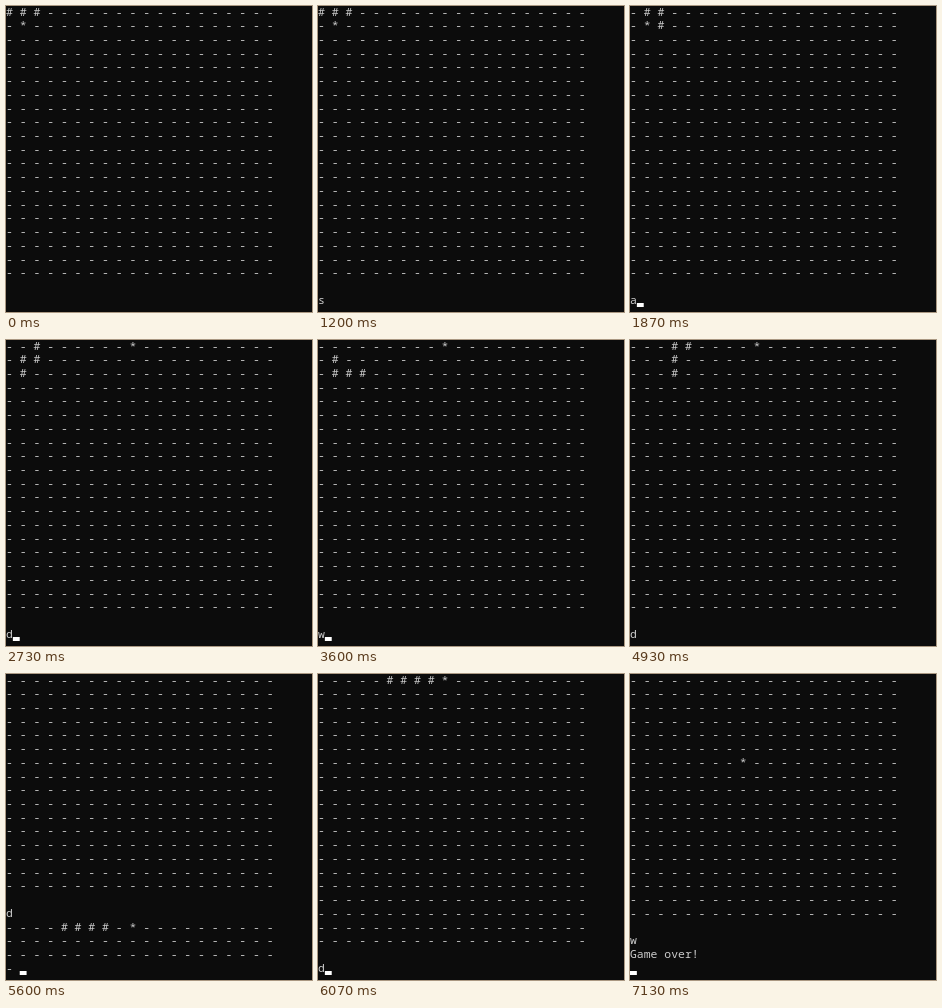
An HTML page that plays this animation: 306x306 px, repeating every 7.59 s.

```html
<!DOCTYPE html>
<html lang="en">
<head>
<meta charset="utf-8">
<title>Console snake</title>
<style>
  html, body { margin: 0; width: 100%; height: 100%; overflow: hidden; background: #0c0c0c; }
  /* Laid out on a 12 x 24 cell, then scaled to the console cell size. */
  #screen {
    position: absolute; left: 0; top: 0;
    transform: scale(.5717); transform-origin: 0 0;
    color: #ccc;
  }
  pre { margin: 0; transform: translateY(-2.33px); font: 20px/24px "Noto Sans Mono", monospace; }
  #cursor { position: absolute; width: 12px; height: 7px; transform: translateY(-.5px); background: #fff; }
</style>
</head>
<body>
<div id="screen"><pre id="text"></pre><div id="cursor"></div></div>
<script>
const LOOP = 7590, SIZE = 20, ROWS = 22, LINE = SIZE * 2 + 1;
const DIRS = { w: [0, -1], a: [-1, 0], s: [0, 1], d: [1, 0] };

// key, time typed, then times of output; the last one completes the turn
const turns = [
  ['s', 870, 1530, 1600],
  ['a', 1870, 2070],
  ['s', 2330, 2470, 2530],
  ['d', 2730, 2800, 2870, 2930],
  ['d', 3200, 3330, 3400],
  ['w', 3600, 3800],
  ['w', 4130, 4270, 4330],
  ['d', 4470, 4670],
  ['d', 4870, 5000, 5070],
  ['d', 5200, 5270, 5330],
  ['d', 5470, 5600, 5670],
  ['d', 5800, 5870, 5930],
  ['d', 6070, 6270],
  ['w', 6670, 7070, 7130]
];
const cursorOff = [[0, 670], [1200, 1530], [4930, 5000]];

const snake = [[0, 0], [1, 0], [2, 0]];
const foods = [[1, 1], [9, 0], [8, 8]];
const same = (a, b) => a[0] === b[0] && a[1] === b[1];

function board() {
  let out = '';
  for (let y = 0; y < SIZE; y++) {
    for (let x = 0; x < SIZE; x++) {
      const cell = [x, y];
      out += (snake.some(p => same(p, cell)) ? '#' : same(foods[0], cell) ? '*' : '-') + ' ';
    }
    out += '\n';
  }
  return out + '\n';
}

function move(key) {
  const [x, y] = snake[snake.length - 1], [dx, dy] = DIRS[key];
  const head = [x + dx, y + dy];
  if (head[1] < 0) return 'Game over!\n';
  snake.push(head);
  if (same(head, foods[0])) foods.shift();
  else snake.shift();
  return board();
}

// The whole session is one stream; marks say how much is printed when.
let log = board();
const marks = [[0, log.length]];
for (const [key, typed, ...prints] of turns) {
  log += key;
  marks.push([typed, log.length]);
  const start = log.length;
  log += '\n' + move(key);
  const over = log.length - start < LINE;
  prints.forEach((t, i) => {
    const part = over ? 1 : 1 + (3 + i * 8) * LINE + 2;
    marks.push([t, i === prints.length - 1 ? log.length : start + part]);
  });
}

const text = document.getElementById('text');
const cursor = document.getElementById('cursor');
let shown = -1;

function draw(now) {
  const t = now % LOOP;
  let n = 0;
  for (const [at, count] of marks) if (t >= at) n = count;
  if (n !== shown) {
    shown = n;
    const lines = log.slice(0, n).split('\n').slice(-ROWS);
    text.textContent = lines.join('\n');
    cursor.style.left = lines[lines.length - 1].length * 12 + 'px';
    cursor.style.top = (lines.length - 1) * 24 + 16 + 'px';
  }
  const off = cursorOff.some(([a, b]) => t >= a && t < b);
  cursor.style.visibility = off ? 'hidden' : 'visible';
}

const begin = performance.now();
function tick() {
  draw(performance.now() - begin);
  requestAnimationFrame(tick);
}
tick();
</script>
</body>
</html>
```
